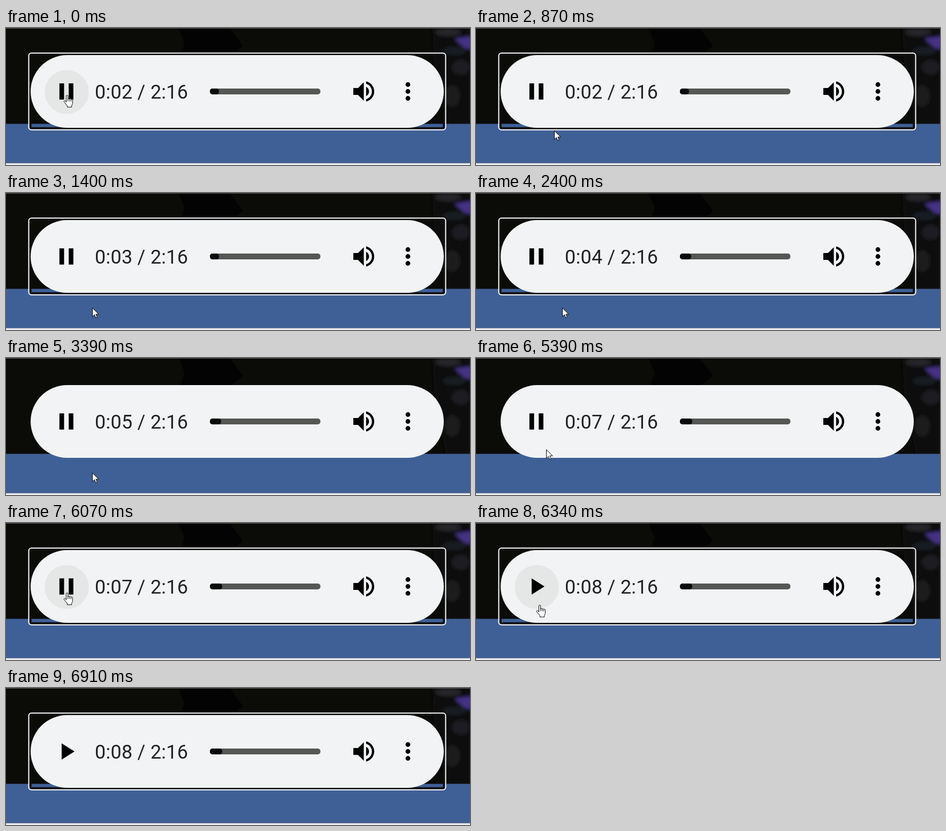
Recreate the animation shown at these times as an HTML page. Size 867 px wide and 258 px high, loop 7620 ms.

```html
<!DOCTYPE html>
<html lang="en">
<head>
<meta charset="utf-8">
<title>Audio player</title>
<style>
html, body { margin: 0; width: 100%; height: 100%; overflow: hidden; background: #0b0b08; }
svg { display: block; }
text { font: 36px Roboto, sans-serif; letter-spacing: .25px; fill: #202224; white-space: pre; }
</style>
</head>
<body>
<svg width="867" height="258" viewBox="0 0 867 258">
  <defs>
    <filter id="soft" x="-50%" y="-50%" width="200%" height="200%"><feGaussianBlur stdDeviation="3"/></filter>
    <clipPath id="photo"><rect width="867" height="181"/></clipPath>
  </defs>

  <rect width="867" height="181" fill="#0b0b08"/>
  <g clip-path="url(#photo)">
    <path d="M322 0H418L443 34 420 51H326L334 28Z" fill="#030303"/>
    <g filter="url(#soft)">
      <path d="M797 0H867V181H822L800 70Z" fill="#0e0e10"/>
      <ellipse cx="826" cy="8" rx="24" ry="7" fill="#25262a"/>
      <ellipse cx="838" cy="43" rx="22" ry="8" fill="#191a20"/>
      <ellipse cx="850" cy="74" rx="17" ry="14" fill="#1c1d20"/>
      <ellipse cx="834" cy="128" rx="14" ry="20" fill="#1b1d1a"/>
      <path d="M838 20L872 15V41L856 37Z" fill="#453285"/>
    </g>
  </g>
  <rect width="867" height="1" fill="#5c5c5c"/>
  <rect y="180.5" width="867" height="74" fill="#3f6096"/>
  <rect y="254.5" width="867" height="4" fill="#e9eaf0"/>

  <g id="ring" fill="none">
    <rect x="45.5" y="50" width="773" height="139" rx="3" stroke="#101010" stroke-width="4.5"/>
    <rect x="42.5" y="47.3" width="779" height="144.4" rx="5" stroke="#fff" stroke-width="2"/>
  </g>
  <rect x="46" y="51" width="772" height="137" rx="68.5" fill="#f1f3f4"/>
  <circle id="hover" cx="113.5" cy="120.5" r="41.3" fill="#e5e7e7"/>

  <g id="pause"><path d="M99.8 104.3h8.7v30.4h-8.7zM117.2 104.3h8.7v30.4h-8.7z"/></g>
  <path id="play" d="M104 104.3v30.4L128 119.5z"/>
  <text id="time" x="166" y="133"></text>
  <rect x="381" y="114" width="206.5" height="11" rx="5" fill="#555755"/>
  <rect id="fill" x="381" y="114" height="11" rx="5" fill="#080a09"/>
  <path transform="translate(642.5 93.5) scale(2.17)" d="M3 9v6h4l5 5V4L7 9H3zm13.5 3c0-1.77-1.02-3.29-2.5-4.03v8.05c1.48-.73 2.5-2.25 2.5-4.02zM14 3.23v2.06c2.89.86 5 3.54 5 6.71s-2.11 5.85-5 6.71v2.06c4.01-.91 7-4.49 7-8.77s-2.99-7.86-7-8.77z"/>
  <circle cx="751" cy="106.5" r="4.4"/>
  <circle cx="751" cy="119.5" r="4.4"/>
  <circle cx="751" cy="132.5" r="4.4"/>

  <g fill="#fff" stroke="#000" stroke-linejoin="round">
    <path id="arrow" d="M.5.5V16.8L4.3 13.2 6.8 18.9 9.3 17.8 6.9 12.2H12Z"/>
    <g id="hand">
      <path d="M-.5 14V2.2a1.6 1.6 0 0 1 3.2 0V8.3a1.5 1.5 0 0 1 3 .2a1.5 1.5 0 0 1 2.9.7a1.4 1.4 0 0 1 2.8.9V15.5c0 2-1.5 3.4-1.8 5.3V23H1.5V20.8C.5 18.6-3 15.5-4.6 12.8c-.8-1.5 1-2.5 2.2-1.5L-.5 13.4Z"/>
      <path d="M2.7 8V12M5.7 8.5V12M8.6 9.5V12.4" fill="none"/>
    </g>
  </g>
</svg>
<script>
const LOOP = 7620;
const $ = id => document.getElementById(id);

// Each track lists [start ms, value...]; a value holds until the next start.
const pointer = [
  [0, 113, 126, 'hand'], [320, 120, 139, 'hand'], [460, 124, 150, 'hand'],
  [590, 130, 163, 'arrow'], [710, 136, 176, 'arrow'], [870, 146, 193, 'arrow'],
  [990, 155, 203, 'arrow'], [1140, 158, 212, 'arrow'], [1280, 161, 216, 'arrow'],
  [4830, 155, 212, 'arrow'], [4950, 148, 209, 'arrow'], [5110, 145, 207, 'arrow'],
  [5390, 131, 172, 'arrow'], [5540, 123, 150, 'hand'], [5660, 113, 131, 'hand'],
  [6340, 118, 154, 'hand'], [6490, 260, 184, 'arrow'], [6630, 449, 216, 'arrow'],
  [6760, 638, 248, 'arrow'], [6910, 0, 0, '']
];
const hover = [[0, 1], [590, .6], [710, .25], [870, 0], [5540, .5], [5660, 1], [6490, .6], [6630, .25], [6760, 0]];
const seconds = [[0, 2], [1400, 3], [2400, 4], [3390, 5], [4410, 6], [5390, 7], [6190, 8]];
const progress = [[0, 398], [2400, 402], [4410, 404]];
const focus = [[0, true], [2550, false], [6070, true]];
const playing = [[0, true], [6190, false]];

const at = (track, t) => track.findLast(step => step[0] <= t).slice(1);
const show = (id, on) => $(id).setAttribute('visibility', on ? 'visible' : 'hidden');

function draw(t) {
  const [x, y, shape] = at(pointer, t);
  for (const id of ['arrow', 'hand']) {
    show(id, id === shape);
    $(id).setAttribute('transform', `translate(${x} ${y})`);
  }
  const [on] = at(playing, t);
  show('pause', on);
  show('play', !on);
  show('ring', at(focus, t)[0]);
  $('hover').setAttribute('opacity', at(hover, t)[0]);
  $('fill').setAttribute('width', at(progress, t)[0] - 381);
  $('time').textContent = `0:0${at(seconds, t)[0]} / 2:16`;
}

const start = performance.now();
function tick() {
  draw((performance.now() - start) % LOOP);
  requestAnimationFrame(tick);
}
tick();
</script>
</body>
</html>
```
